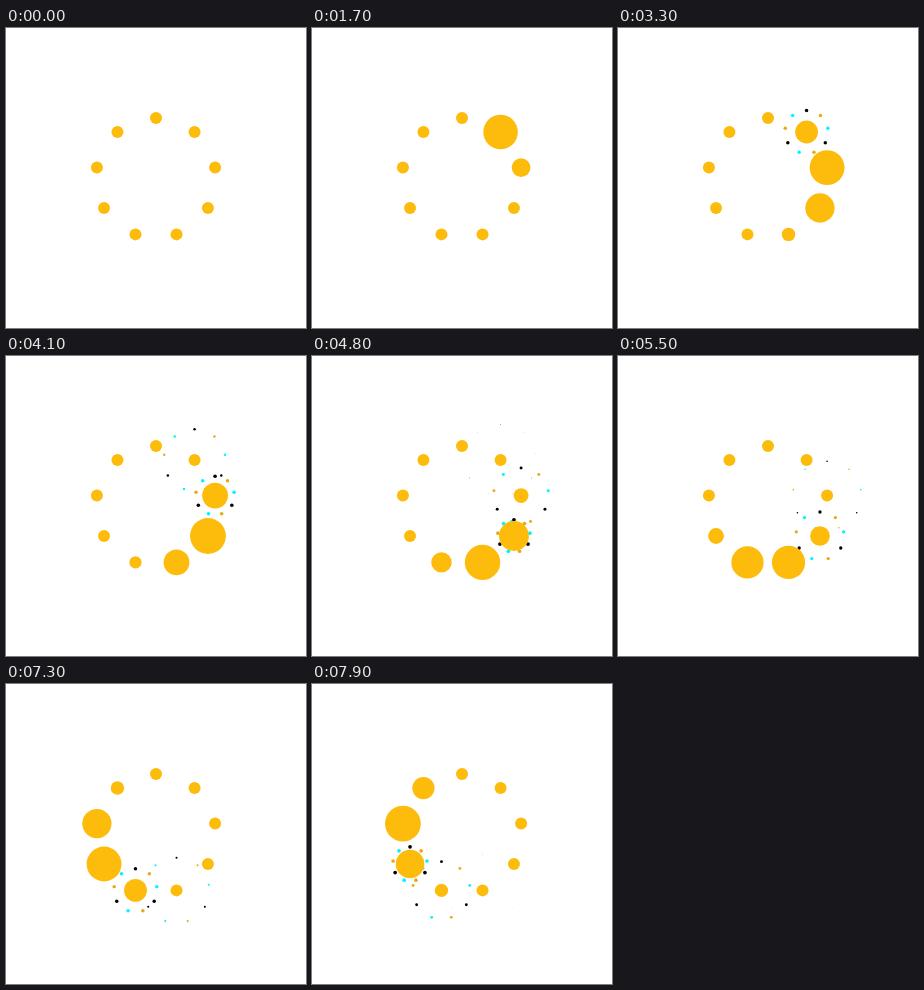
These frames come from a looping animation (300 px wide and 300 px high, 8 s). An HTML page with a canvas:

```html
<!DOCTYPE html>
<html lang="en">
<head>
<meta charset="utf-8">
<title>Pulsing ring</title>
<style>
html, body { margin: 0; width: 100%; height: 100%; overflow: hidden; background: #fff; }
canvas { display: block; width: 300px; height: 300px; }
</style>
</head>
<body>
<canvas id="stage"></canvas>
<script>
const SIZE = 300, LOOP = 8000, COUNT = 9, STEP = 1000;
const GOLD = '#fdbc0b';
const SPARKS = ['#000', '#e8ab18', '#00f6fb'];

const canvas = document.getElementById('stage');
const ctx = canvas.getContext('2d');
const ratio = window.devicePixelRatio || 1;
canvas.width = canvas.height = SIZE * ratio;
ctx.scale(ratio, ratio);

const clamp = v => Math.max(0, Math.min(1, v));
const mix = (a, b, k) => a + (b - a) * k;
const smooth = u => u * u * (3 - 2 * u);

// Cubic Bezier easing, solved for x by bisection
function bezier(x1, y1, x2, y2) {
  const at = (a, b, s) => 3 * (1 - s) * (1 - s) * s * a + 3 * (1 - s) * s * s * b + s * s * s;
  return x => {
    let lo = 0, hi = 1;
    for (let n = 0; n < 24; n++) {
      const mid = (lo + hi) / 2;
      if (at(x1, x2, mid) < x) lo = mid; else hi = mid;
    }
    return at(y1, y2, lo);
  };
}
const fall = bezier(0.333, 0, 0.833, 0.833);

function disc(x, y, r, color) {
  ctx.fillStyle = color;
  ctx.beginPath();
  ctx.arc(x, y, r, 0, Math.PI * 2);
  ctx.fill();
}

// Point k of nine around a centre, clockwise from the top
function around(cx, cy, r, k) {
  const a = k * Math.PI * 2 / COUNT;
  return [cx + r * Math.sin(a), cy - r * Math.cos(a)];
}

// Age 0 is when the dot starts to swell; it peaks at 2 s and rests at 4 s
function dotRadius(age) {
  if (age <= 0 || age >= 4000) return 6;
  return age < 2000 ? mix(6, 18, smooth(age / 2000)) : mix(18, 6, fall((age - 2000) / 2000));
}

function burst(cx, cy, age) {
  const u = clamp((age - 2000) / 3000);
  if (u === 0 || u === 1) return;
  const reach = mix(12, 36, smooth(u));
  const r = 1.9 * (1 - u * u * u);
  for (let k = 0; k < COUNT; k++) {
    const [x, y] = around(cx, cy, reach, k);
    disc(x, y, r, SPARKS[k % 3]);
  }
}

function draw(t) {
  ctx.fillStyle = '#fff';
  ctx.fillRect(0, 0, SIZE, SIZE);
  const dots = [];
  for (let i = 1; i <= COUNT; i++) {
    const [x, y] = around(150, 150, 60, i);
    dots.push({ x, y, age: t - (i - 1) * STEP });
  }
  for (const d of dots) burst(d.x, d.y, d.age);
  for (const d of dots) disc(d.x, d.y, dotRadius(d.age), GOLD);
}

const start = performance.now();
function tick() {
  draw((performance.now() - start) % LOOP);
  requestAnimationFrame(tick);
}
tick();
</script>
</body>
</html>
```
